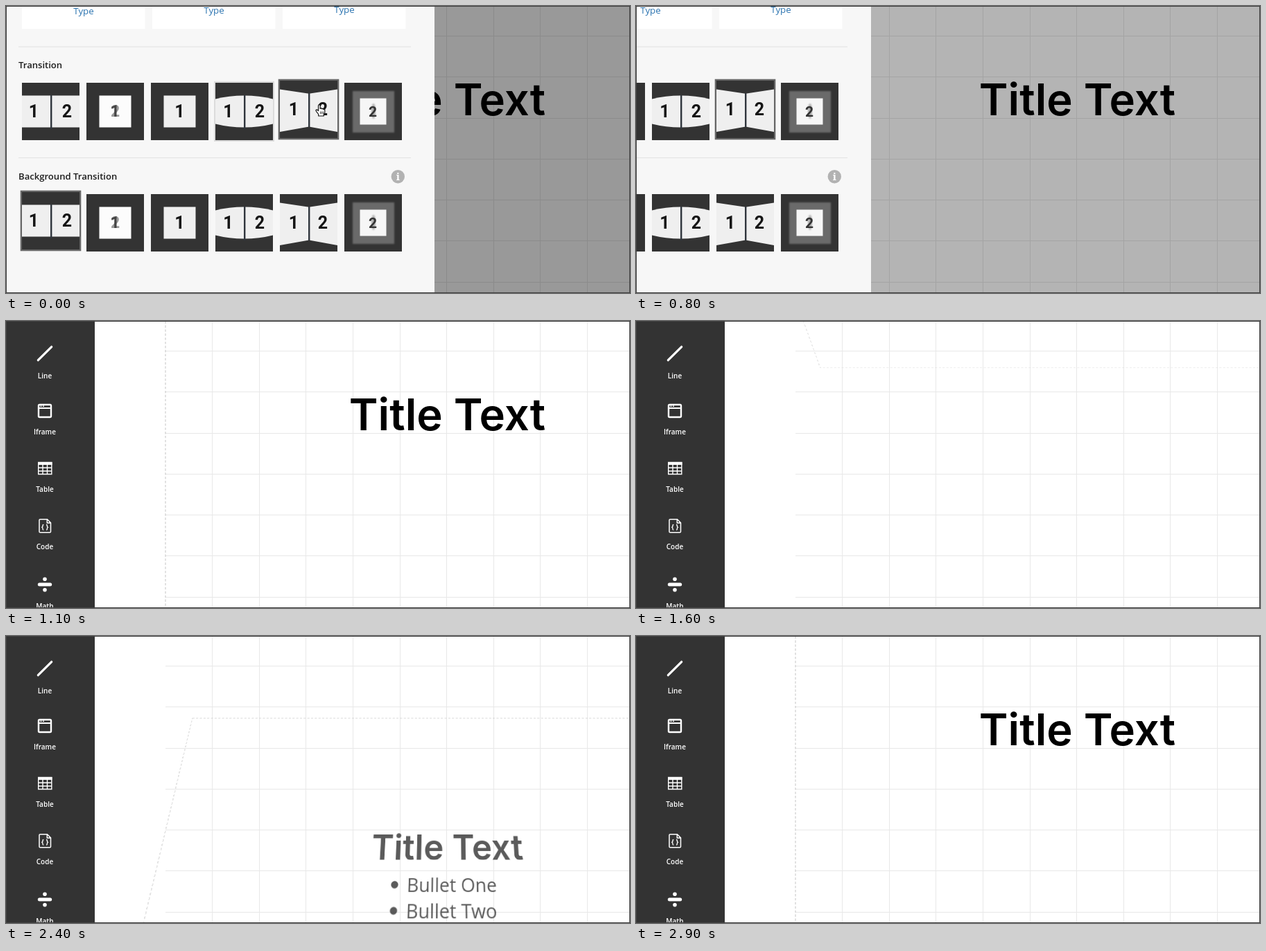
Animation of 900 by 415 pixels, one loop 3400 ms. Source, as an HTML page:

```html
<!DOCTYPE html>
<html lang="en">
<head>
<meta charset="utf-8">
<title>Slide transition</title>
<style>
html, body { margin: 0; width: 100%; height: 100%; overflow: hidden; background: #fff; }
#stage { position: absolute; left: 0; top: 0; width: 900px; height: 415px; overflow: hidden; background: #fff; }
#stage > svg { position: absolute; left: 0; top: 0; }
#deck { position: absolute; left: 229.5px; top: -134px; width: 960px; height: 700px;
  transform-origin: 0 0; transform: scale(.845); perspective: 600px; }
.slide { position: absolute; left: 0; top: 0; width: 960px; height: 700px; }
.slide svg { display: block; overflow: visible; }
.edge { fill: none; stroke: #c4c4c4; stroke-width: 1.2; stroke-dasharray: 4 3; }
.head { font-family: Inter, Roboto, sans-serif; font-weight: 600; text-anchor: middle; }
.list { font: 30px "Open Sans", "Noto Sans", sans-serif; }
.tool { font: 600 10px "Open Sans", "Noto Sans", sans-serif; text-anchor: middle; fill: #fff; }
.label { font: 600 13.1px "Open Sans", "Noto Sans", sans-serif; fill: #1c1c1c; }
.type { font: 13.3px "Open Sans", "Noto Sans", sans-serif; text-anchor: middle; fill: #2a73b0; }
.digit { font-family: Roboto, "Open Sans", sans-serif; font-weight: 600; font-stretch: 75%; text-anchor: middle; }
.info { font: bold 15px "Noto Serif", "Liberation Serif", serif; text-anchor: middle; fill: #fff; }
</style>
</head>
<body>
<div id="stage">
  <svg id="grid" width="900" height="415"></svg>
  <div id="deck">
    <div class="slide" id="title">
      <svg width="960" height="700">
        <rect class="edge" width="960" height="700"/>
        <text class="head" x="481" y="345.5" font-size="75">Title Text</text>
      </svg>
    </div>
    <div class="slide" id="bullets">
      <svg width="960" height="700" fill="#222">
        <rect class="edge" width="960" height="700"/>
        <text class="head" x="481" y="255" font-size="57">Title Text</text>
        <g id="items" class="list"></g>
      </svg>
    </div>
  </div>
  <svg id="tools" width="900" height="415"></svg>
  <svg id="settings" width="900" height="415">
    <rect id="shade" width="900" height="415"/>
    <g id="panel"></g>
    <g id="cursor" fill="#fff" stroke="#111" stroke-width="1.2" stroke-linejoin="round">
      <path d="M4.2 16.5V14L1 9.8Q-.3 7.6 1.6 7.3Q2.6 7.3 4 9V1.6Q4.2.2 5.3.2Q6.5.2 6.6 1.6V6Q7 5 8 5.2Q9 5.4 9 6.3Q9.6 5.6 10.5 5.9Q11.3 6.2 11.3 7Q12.2 6.5 12.9 7.1Q13.4 7.6 13.3 8.6V11.4L11.8 14.4V16.5Z"/>
      <path d="M7 10V13.6M9 10V13.6M11 10V13.6" stroke-width=".8"/>
    </g>
  </svg>
  <svg width="900" height="415"><rect x=".5" y=".5" width="899" height="414" fill="none" stroke="#404040"/></svg>
</div>
<script>
const LOOP = 3400, STEP = 100;
const $ = id => document.getElementById(id);
const rect = (x, y, w, h, fill, more = '') =>
  `<rect x="${x}" y="${y}" width="${w}" height="${h}" fill="${fill}" ${more}/>`;
const path = (d, more) => `<path d="${d}" ${more}/>`;
const text = (cls, x, y, str, more = '') => `<text class="${cls}" x="${x}" y="${y}" ${more}>${str}</text>`;
const digit = (n, x, y, size = 25, fill = '#151515') =>
  text('digit', x, y, n, `font-size="${size}" fill="${fill}"`);

function buildGrid() {
  let d = '';
  for (let i = 1; i < 10; i++) d += `M${Math.round(229.5 + i * 67.62) + .5} 0V415`;
  for (let i = 0; i < 7; i++) d += `M230 ${Math.floor(43.5 + i * 59.25) + .5}H900`;
  $('grid').innerHTML = path(d, 'stroke="#e8e8e8"');
}

function buildItems() {
  $('items').innerHTML = ['One', 'Two', 'Three'].map((n, i) => {
    const y = 305 + i * 39;
    return `<circle cx="395" cy="${y - 11}" r="5.8"/>` + text('', 415, y, 'Bullet ' + n);
  }).join('');
}

function buildTools() {
  const line = 'fill="none" stroke="#fff" ';
  const labels = [['Line', 83], ['Iframe', 164], ['Table', 247], ['Code', 330], ['Math', 415.5]];
  $('tools').innerHTML = rect(0, 0, 128, 415, '#333')
    + path('M46.3 56.7L65.7 37.3', line + 'stroke-width="3.2" stroke-linecap="round"')
    + rect(47, 121, 18, 18, 'none', 'rx="1.5" stroke="#fff" stroke-width="2.4"')
    + path('M47 126H65', line + 'stroke-width="2"')
    + path('M49.5 123.3H51.5M53 123.3H55', line + 'stroke-width="1.6"')
    + rect(46, 204, 20.5, 4, '#fff')
    + path('M46.7 204.5H65.8V221.5H46.7ZM46.7 212.3H65.8M46.7 217H65.8M53 207V221M59.5 207V221', line + 'stroke-width="1.4"')
    + path('M48 288Q48 286.7 49.3 286.7H59.5L64.5 291.7V304.5Q64.5 305.8 63.2 305.8H49.3Q48 305.8 48 304.5ZM59.3 287V292H64.3', line + 'stroke-width="1.5"')
    + path('M54.3 294.5Q52.9 294.5 52.9 296V297.2L51.8 298.3L52.9 299.4V300.8Q52.9 302.2 54.3 302.2M58 294.5Q59.4 294.5 59.4 296V297.2L60.5 298.3L59.4 299.4V300.8Q59.4 302.2 58 302.2', line + 'stroke-width="1.3"')
    + path('M48.3 381H63.7', line + 'stroke-width="5" stroke-linecap="round"')
    + '<g fill="#fff"><circle cx="56" cy="373.3" r="2.8"/><circle cx="56" cy="388.7" r="2.8"/></g>'
    + labels.map(([s, y]) => text('tool', 56, y, s)).join('');
}

const paper = '#efefef';
const split = rect(41, 18, 2.4, 49, '#30363d');
const card = fill => rect(18.5, 18.5, 46, 46, fill);
const thumbs = [
  rect(0, 18.5, 83, 46, paper) + split + digit(1, 17, 50) + digit(2, 65, 50),
  card('#fcfcfc') + digit(2, 41.5, 49, 23, '#999') + digit(1, 41, 49, 23, '#444'),
  card(paper) + digit(1, 41.5, 50),
  path('M0 23.5Q20 18.5 41.5 18.5Q63 18.5 83 23.5V59.5Q63 64.5 41.5 64.5Q20 64.5 0 59.5Z', `fill="${paper}"`)
    + split + digit(1, 18.5, 50) + digit(2, 64, 50),
  path('M0 12.5L42 18.8L83 12.5V74L42 66.5L0 74Z', `fill="${paper}"`)
    + split + digit(1, 20, 50) + digit(2, 62, 50),
  rect(12, 12, 60, 60, '#6a6a6a', 'filter="url(#soft)"') + rect(22.5, 22.5, 38, 38, '#f6f6f6')
    + '<ellipse cx="42" cy="41" rx="3" ry="11" fill="#aaa" filter="url(#soft)"/>' + digit(2, 41, 49, 21, '#333')
];

function row(y, chosen) {
  return thumbs.map((art, i) => {
    const on = i === chosen;
    return `<g transform="translate(${23 + 93 * i} ${on ? y - 3 : y})">`
      + (on ? rect(-2.3, -2.3, 87.6, 87.6, '#666') : '')
      + rect(0, 0, 83, 83, '#333') + art + '</g>';
  }).join('');
}

function buildPanel() {
  const rule = y => rect(18, y, 566, 1, '#e2e2e2');
  $('panel').innerHTML = '<filter id="soft"><feGaussianBlur stdDeviation="1"/></filter>'
    + rect(0, 0, 618, 415, '#f7f7f7')
    + [[23, 12], [211, 11], [399, 10]].map(([x, y]) =>
      rect(x, 0, 177.5, 33, '#fff') + text('type', x + 89, y, 'Type')).join('')
    + rule(58.5) + text('label', 18, 90, 'Transition')
    + rect(300, 108.7, 87, 87.3, '#dcdcdc', 'id="hover"') + row(111, 4)
    + rule(219) + text('label', 18, 250.5, 'Background Transition')
    + '<circle cx="565.3" cy="246.7" r="9.7" fill="#b2b2b2"/>' + text('info', 565.3, 252, 'i')
    + row(272, 0);
}

// cubic-bezier(.26, .86, .44, .985)
function ease(x) {
  if (x >= 1) return 1;
  const curve = (s, a, b) => 3 * (1 - s) * (1 - s) * s * a + 3 * (1 - s) * s * s * b + s * s * s;
  let lo = 0, hi = 1;
  for (let i = 0; i < 24; i++) {
    const mid = (lo + hi) / 2;
    if (curve(mid, .26, .44) < x) lo = mid; else hi = mid;
  }
  return curve(lo, .86, .985);
}

// Concave turn: p is -1 before, 0 at rest, 1 after.
function pose(el, p, axis = 'Y') {
  const shift = `translate${axis}(${(axis === 'Y' ? 560 : 960) * p}px)`;
  const turn = axis === 'Y' ? `rotateX(${70 * p}deg)` : `rotateY(${-90 * p}deg)`;
  el.style.visibility = Math.abs(p) > .95 ? 'hidden' : 'visible';
  el.style.opacity = 1 - Math.abs(p);
  el.style.transform = p ? `${shift} ${turn} ${shift}` : 'none';
}

// 0 shows the title slide, 1 the bullet slide.
function position(t) {
  if (t < 1600 || t >= 2900) return 0;
  if (t < 1900) return ease(.14 + (t - 1600) / 500);
  if (t < 2400) return 1;
  return 1 - ease(.082 + (t - 2400) / 667);
}

function draw(t) {
  const pos = position(t);
  if (t >= 900 && t < 1100) pose($('title'), 1 - ease(.43 + (t - 900) / 400), 'X');
  else pose($('title'), -pos);
  pose($('bullets'), 1 - pos);

  $('settings').style.display = t < 900 ? '' : 'none';
  const closing = t >= 800;
  $('shade').setAttribute('fill-opacity', closing ? .295 : .4);
  $('panel').setAttribute('transform', `translate(${closing ? -279 : 0} 0)`);
  $('hover').style.display = t < 100 ? '' : 'none';
  $('cursor').style.display = t < 600 ? '' : 'none';
  const k = Math.pow(Math.min(t / 500, 1), 1.5);
  $('cursor').setAttribute('transform', `translate(${446.5 + 36 * k} ${142.5 + 238 * k})`);
}

buildGrid();
buildItems();
buildTools();
buildPanel();

const start = performance.now();
function tick() {
  const t = (performance.now() - start) % LOOP;
  draw(Math.floor(t / STEP) * STEP);
  requestAnimationFrame(tick);
}
tick();
</script>
</body>
</html>
```
